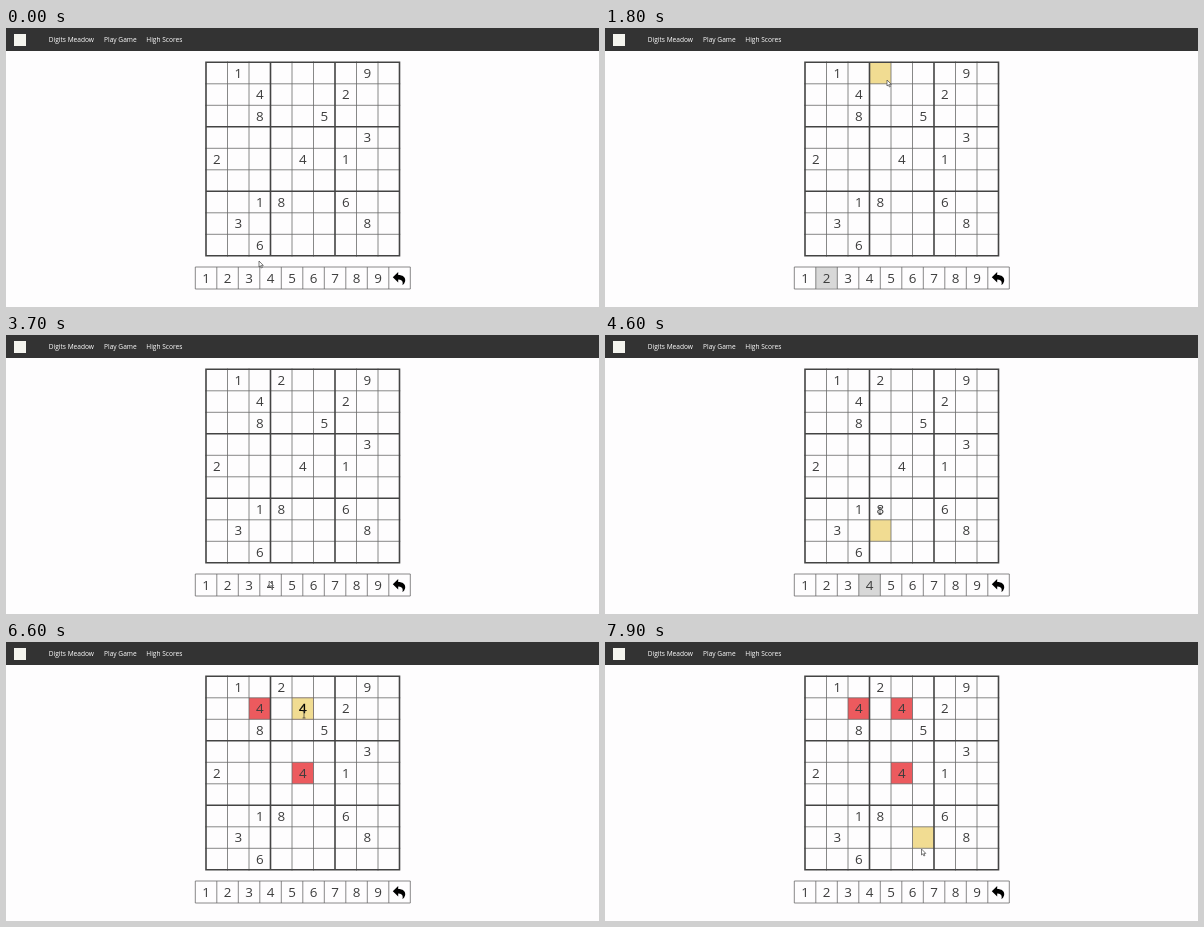
An HTML page that plays this animation: 593 px wide and 279 px high, repeating every 8000 ms.

```html
<!DOCTYPE html>
<html lang="en">
<head>
<meta charset="utf-8">
<title>Number puzzle</title>
<style>
html, body { margin: 0; width: 100%; height: 100%; overflow: hidden; background: #fefdfe; }
svg { display: block; width: 593px; height: 279px; font-family: "Open Sans", "Noto Sans", sans-serif; }
.nav { font-size: 6.6px; fill: #fff; }
.digit { font-size: 13.4px; fill: #3c3c3c; text-anchor: middle; }
.hot { fill: #000; stroke: #000; stroke-width: .3; }
.thin { stroke: #6a6a6a; stroke-width: .8; fill: none; }
.thick { stroke: #444; stroke-width: 1.6; fill: none; }
</style>
</head>
<body>
<svg viewBox="0 0 593 279">
  <rect width="593" height="23" fill="#333"/>
  <rect x="8" y="6" width="12" height="12" fill="#f4f4ee"/>
  <g class="nav">
    <text x="42.7" y="14.4">Digits Meadow</text>
    <text x="98" y="14.4">Play Game</text>
    <text x="140.3" y="14.4">High Scores</text>
  </g>
  <g id="fills"></g>
  <g id="lines"></g>
  <g id="digits"></g>
  <path d="M386.8 249.2L392.2 244V247.1C397 247.2 399.4 249.3 399.2 252.6C399.1 254.5 398 256 396.4 257C397.4 253.4 396 251.5 392.2 251.4V254.6Z"/>
  <g id="pointer"></g>
</svg>
<script>
const LOOP = 8000, STEP = 100;
const CELL = 21.5, LEFT = 200, TOP = 34.3, KEY_LEFT = 189.3, KEY_TOP = 239;
const GOLD = '#f1dc92', RED = '#ec5a5e', GREY = '#d8d8d8';
const board = [
  '.1.....9.', '..4...2..', '..8..5...',
  '.......3.', '2...4.1..', '.........',
  '..18..6..', '.3.....8.', '..6......'
];
// Pointer path: time, x, y
const path = [
  [0, 253, 233], [300, 224, 246], [600, 222, 247], [900, 283, 70], [1100, 282, 52],
  [2500, 282, 52], [3000, 270, 100], [3200, 269, 106.5], [3600, 263, 246], [4300, 264, 246],
  [4600, 275, 176], [5100, 295.5, 70], [5500, 295.5, 70], [5900, 298, 72.5], [7300, 298, 72.5],
  [7800, 316, 192], [7900, 316.5, 207], [8000, 317, 216]
];
// Chosen key and the span in which it stays active
const picks = [
  { key: 2, from: 500, to: 2100, row: 0, col: 3 },
  { key: 4, from: 3900, to: 5900, row: 1, col: 4 }
];
const clashes = [[1, 2], [1, 4], [4, 4]];

const $ = id => document.getElementById(id);
const rect = (x, y, fill) => `<rect x="${x}" y="${y}" width="${CELL}" height="${CELL}" fill="${fill}"/>`;
const cellRect = (row, col, fill) => rect(LEFT + col * CELL, TOP + row * CELL, fill);
const digit = (x, y, value, hot) =>
  `<text class="digit${hot ? ' hot' : ''}" x="${x + CELL / 2}" y="${y + CELL / 2 + 4.8}">${value}</text>`;

function drawLines() {
  const side = 9 * CELL;
  let thin = '', thick = '', keys = `M${KEY_LEFT} ${KEY_TOP}h${10 * CELL}v${CELL + .5}h${-10 * CELL}z`;
  for (let i = 0; i < 10; i++) {
    const line = `M${LEFT + i * CELL} ${TOP - .8}v${side + 1.6}M${LEFT - .8} ${TOP + i * CELL}h${side + 1.6}`;
    if (i % 3) thin += line; else thick += line;
    if (i) keys += `M${KEY_LEFT + i * CELL} ${KEY_TOP}v${CELL + .5}`;
  }
  $('lines').innerHTML = `<path class="thin" d="${thin + keys}"/><path class="thick" d="${thick}"/>`;
}

function pointerAt(t) {
  const i = Math.max(1, path.findIndex(p => p[0] >= t));
  const [t0, x0, y0] = path[i - 1], [t1, x1, y1] = path[i];
  const k = Math.max(0, (t - t0) / (t1 - t0));
  return [x0 + (x1 - x0) * k, y0 + (y1 - y0) * k];
}

const cellAt = ([x, y]) => [Math.floor((y - TOP) / CELL), Math.floor((x - LEFT) / CELL)];

function draw(t) {
  const values = board.map(row => [...row]);
  for (const p of picks) if (t >= p.to) values[p.row][p.col] = p.key;

  // Hover colour trails the pointer by one step
  const [hoverRow, hoverCol] = cellAt(pointerAt(Math.max(0, t - STEP)));
  let fills = '', digits = '';
  for (const p of picks)
    if (t >= p.from && t < p.to) fills += rect(KEY_LEFT + (p.key - 1) * CELL, KEY_TOP, GREY);
  if (t >= picks[1].to) for (const [r, c] of clashes) fills += cellRect(r, c, RED);
  if (values[hoverRow]?.[hoverCol]) fills += cellRect(hoverRow, hoverCol, GOLD);

  values.forEach((row, r) => row.forEach((v, c) => {
    if (v !== '.') digits += digit(LEFT + c * CELL, TOP + r * CELL, v, r === hoverRow && c === hoverCol);
  }));
  for (let k = 0; k < 9; k++) digits += digit(KEY_LEFT + k * CELL, KEY_TOP, k + 1);

  const [x, y] = pointerAt(t), [row, col] = cellAt([x, y]);
  const value = values[row]?.[col];
  const overText = value && value !== '.' &&
    Math.abs(x - LEFT - (col + .5) * CELL) < 4 && Math.abs(y - TOP - (row + .5) * CELL) < 8;
  const shape = overText
    ? '<path d="M-1.5 -3.5H1.5M0 -3.5V3.5M-1.5 3.5H1.5" fill="none" stroke="#333" stroke-width=".7"/>'
    : '<path d="M0 0V6L1.4 4.8L2.4 7L3.4 6.5L2.4 4.4H4.3Z" fill="#fff" stroke="#444" stroke-width=".7"/>';
  $('fills').innerHTML = fills;
  $('digits').innerHTML = digits;
  $('pointer').innerHTML = `<g transform="translate(${x} ${y})">${shape}</g>`;
}

let last = -1;
const start = performance.now();
function tick() {
  const t = Math.floor((performance.now() - start) % LOOP / STEP) * STEP;
  if (t !== last) draw(last = t);
  requestAnimationFrame(tick);
}
drawLines();
tick();
</script>
</body>
</html>
```
